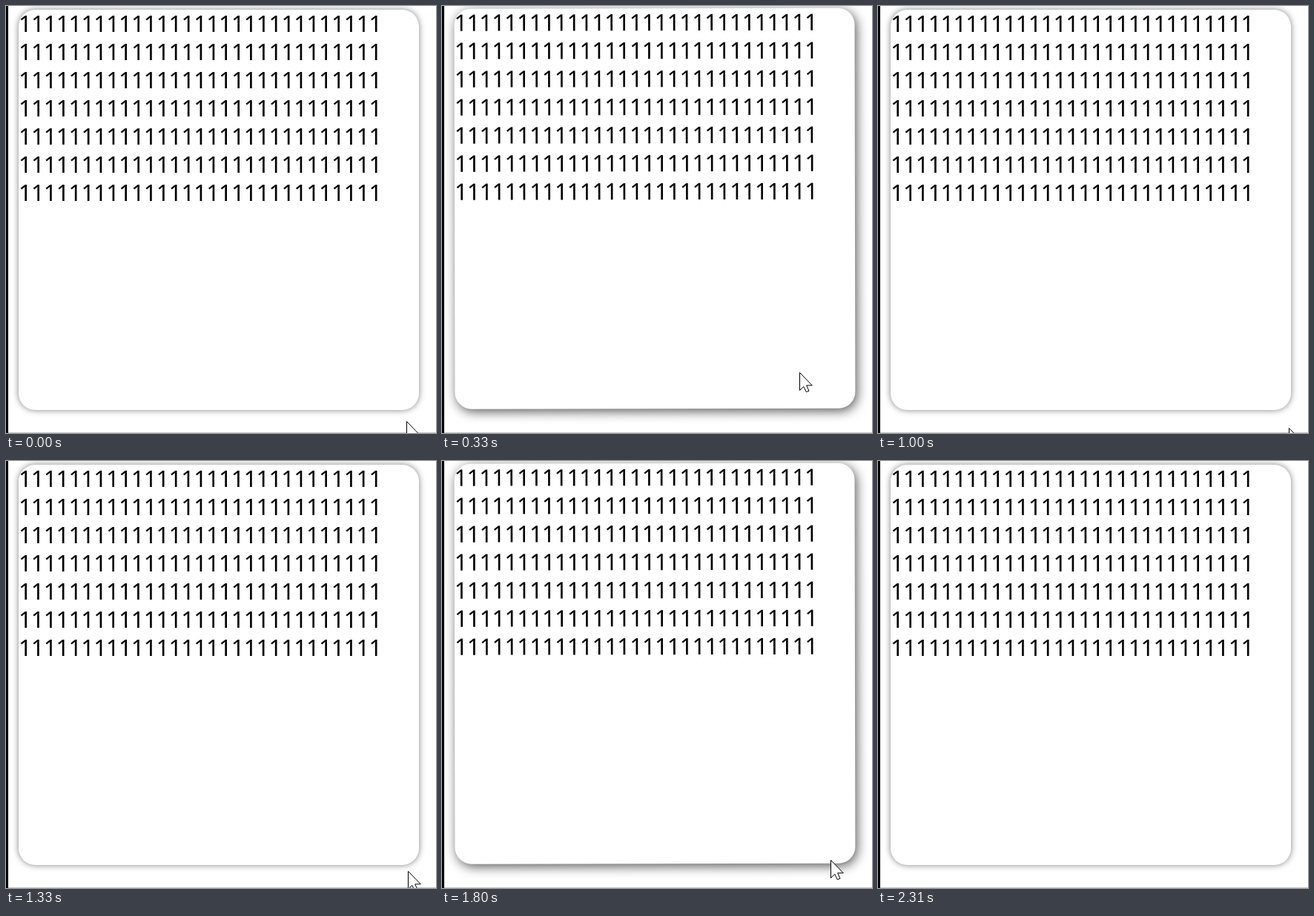
These frames come from a looping animation (580 px wide and 576 px high, 2380 ms). An HTML page with a canvas:

```html
<!DOCTYPE html>
<html lang="en">
<head>
<meta charset="utf-8">
<title>Hover card</title>
<style>
  html, body { margin: 0; width: 100%; height: 100%; overflow: hidden; background: #fff; }
  canvas { display: block; }
</style>
</head>
<body>
<canvas id="stage" width="580" height="576"></canvas>
<script>
const ctx = document.getElementById('stage').getContext('2d');
const LOOP = 2380;
const TICK = LOOP / 36;
const CARD = { x: 17, y: 5, size: 540, radius: 22.5 };
const TEXT = { line: '1'.repeat(29), rows: 7, pitch: 16.875, base: 35, step: 38 };

// Pointer strokes in ticks: moves from start to end, then rests until hidden or replaced.
const STROKES = [
  { start: 0, end: 5, hide: 9, from: [540, 560], to: [482, 494] },
  { start: 15, end: 20, hide: 20, from: [554, 569], to: [542, 553] },
  { start: 20, end: 22, hide: 22, from: [542, 553], to: [517, 518] },
  { start: 22, end: 24, hide: 27, from: [517, 518], to: [415, 222] },
  { start: 27, end: 29, hide: 35, from: [524, 538], to: [543, 563] }
];

// Spans in ticks during which the card is hovered.
const HOVERS = [{ on: 1.7, off: 8.9 }, { on: 19.8, off: 27 }];
const FADE = 2.2;

const ARROW = new Path2D('M.5 .5V24.5L5.8 19.4L9.3 26.7L13 25.2L9.7 17.8H17.3Z');

const mix = (a, b, k) => a + (b - a) * k;
const clamp = k => Math.max(0, Math.min(1, k));
const smooth = k => k * k * (3 - 2 * k);
const fade = age => smooth(clamp(age / FADE));

const hoverAt = tick =>
  HOVERS.reduce((sum, { on, off }) => sum + fade(tick - on) - fade(tick - off), 0);

function drawCard(h) {
  const { x, y, size, radius } = CARD;
  const half = size / 2;
  ctx.save();
  ctx.translate(x + half, y + half - 1.8 * h);
  ctx.rotate(-0.0018 * h);
  ctx.translate(-x - half, -y - half);

  ctx.save();
  ctx.shadowColor = `rgba(0,0,0,${mix(0.5, 0.66, h)})`;
  ctx.shadowBlur = mix(8, 15, h);
  ctx.shadowOffsetX = 2.5 * h;
  ctx.shadowOffsetY = 3.5 * h;
  ctx.fillStyle = '#fff';
  ctx.beginPath();
  ctx.roundRect(x, y, size, size, radius);
  ctx.fill();
  ctx.restore();

  ctx.fillStyle = '#000';
  ctx.font = '31px "Noto Sans", "Open Sans", sans-serif';
  ctx.letterSpacing = '0px';
  ctx.letterSpacing = `${TEXT.pitch - ctx.measureText('1').width}px`;
  for (let i = 0; i < TEXT.rows; i++) {
    ctx.fillText(TEXT.line, x, TEXT.base + i * TEXT.step);
  }
  ctx.restore();
}

function drawPointer(tick) {
  const stroke = STROKES.find(s => tick >= s.start && tick < s.hide);
  if (!stroke) return;
  const { start, end, from, to } = stroke;
  const k = clamp((tick - start) / (end - start));
  ctx.save();
  ctx.translate(...from.map((v, i) => Math.round(mix(v, to[i], k))));
  ctx.fillStyle = '#fff';
  ctx.strokeStyle = '#000';
  ctx.lineWidth = 1;
  ctx.fill(ARROW);
  ctx.stroke(ARROW);
  ctx.restore();
}

function draw(tick) {
  ctx.fillStyle = '#fff';
  ctx.fillRect(0, 0, 580, 576);
  drawCard(hoverAt(tick));
  ctx.fillStyle = '#c8c8c8';
  ctx.fillRect(0, 575, 580, 1);
  ctx.fillStyle = '#000';
  ctx.fillRect(0, 0, 3, 576);
  drawPointer(tick);
}

const begin = performance.now();
function frame() {
  const t = (performance.now() - begin) % LOOP;
  // Steps land on times rounded to 10 ms, so allow a few ms of slack.
  draw(Math.floor((t + 4) / TICK) % 36);
  requestAnimationFrame(frame);
}
frame();
</script>
</body>
</html>
```
